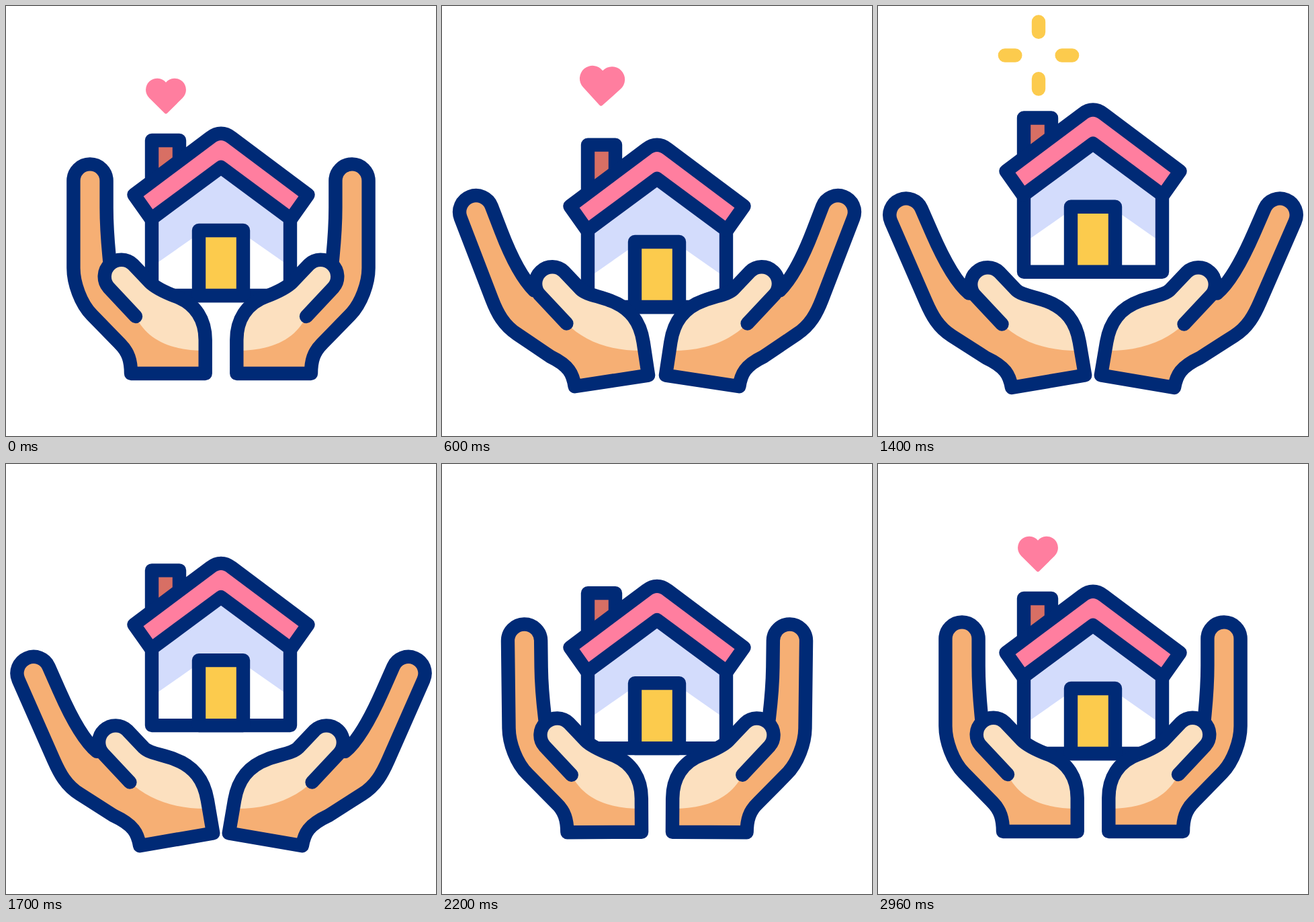
Animation of 640 by 640 pixels, one loop 3000 ms. Source, as an HTML page:

```html
<!DOCTYPE html>
<html lang="en">
<head>
<meta charset="utf-8">
<title>Home in caring hands</title>
<style>
  html, body { margin: 0; height: 100%; overflow: hidden; background: #fff; }
  svg { display: block; width: 100vw; height: 100vh; }
  .line { stroke: #002a76; stroke-width: 20.4; stroke-linecap: round; stroke-linejoin: round; }
</style>
</head>
<body>
<svg viewBox="0 0 640 640">
  <path id="heart" fill="#ff7e9f" d="M0-20.8A17 17 0 1 0-24.7 2.5L-2 25Q0 27 2 25L24.7 2.5A17 17 0 1 0 0-20.8Z"/>
  <path id="spark" fill="none" stroke="#fccb4d" stroke-linecap="round"/>
  <path id="chimney" class="line" fill="#d86f64" d="M217 275V200H258V255"/>
  <g id="house">
    <path fill="#fff" d="M217 431V312L320 240L423 312V431Z"/>
    <path fill="#d3dcfc" d="M217 388V312L320 240L423 312V388L363 346H277Z"/>
    <path class="line" fill="none" d="M217 318V431H423V318"/>
    <path class="line" fill="#fccb4d" d="M287 431V334H353V431Z"/>
    <path class="line" fill="#ff7e9f" d="M190.5 281L304 196Q320 183.5 336 196L449.5 281L424 317L320 240L216 317Z"/>
  </g>
  <g id="hand">
    <path id="skin" fill="#f6af74"/>
    <path id="palm" fill="#fce0bf"/>
    <path id="edge" class="line" fill="none"/>
  </g>
  <use href="#hand" transform="matrix(-1 0 0 1 640 0)"/>
</svg>
<script>
const LOOP = 3000;
const set = (id, name, value) => document.getElementById(id).setAttribute(name, value);

// Progress from 0 to 1 between times a and b, with three kinds of easing
const linear = (t, a, b) => Math.min(1, Math.max(0, (t - a) / (b - a)));
const smooth = (t, a, b) => { const x = linear(t, a, b); return x * x * (3 - 2 * x); };
const easeOut = (t, a, b) => 1 - (1 - linear(t, a, b)) ** 2;

// Openness of the hands: negative is cupped, 0 upright, 1 spread
const openness = t => .9 * smooth(t, 0, 640) + .13 * linear(t, 560, 1640)
  - 1.6 * smooth(t, 1640, 2600) + .57 * smooth(t, 2540, 2960);

// Vertical shift of the house: dip, toss, float, fall, settle
const houseShift = t => 17 * smooth(t, 480, 600) - 40 * smooth(t, 640, 940)
  - 19 * linear(t, 900, 1680) + 52 * smooth(t, 1680, 2540) - 10 * smooth(t, 2560, 2960);

// The chimney trails the house until it falls
const chimneyShift = t => houseShift(t - 70 * (1 - smooth(t, 1500, 1900)));

// Each joint of the hand turns about a pivot and shifts; amounts are for a full spread
const JOINTS = [
  { x: 125, y: 260, turn: -23.5, dx: -83, dy: 51 },     // finger
  { x: 128, y: 460, turn: -13, dx: -18, dy: 31 },       // elbow
  { x: 186, y: 547, turn: -9.6, dx: 13, dy: 21 },       // base
  { x: 252, y: 432, turn: 0, dx: -2, dy: 7 },           // heel
  { x: 171, y: 402, turn: 0, dx: -8.5, dy: 11.5 },      // thumb
  { x: 154.5, y: 382, turn: -45, dx: -19, dy: 45.5 }    // web
];

function mover(joint, open) {
  const angle = joint.turn * open * Math.PI / 180;
  const c = Math.cos(angle), s = Math.sin(angle);
  const left = joint.x + joint.dx * open;
  const top = joint.y + joint.dy * Math.max(0, open) ** .8;
  return (x, y) => {
    x -= joint.x; y -= joint.y;
    return ` ${left + x * c - y * s} ${top + x * s + y * c} `;
  };
}

function drawHand(open) {
  const [f, e, b, p, h, w] = JOINTS.map(joint => mover(joint, open));
  const finger = 'M' + w(154.5, 382) + 'C' + w(152, 355) + f(149.6, 335) + f(149.6, 300)
    + 'L' + f(149.6, 260) + 'A24.6 24.6 0 0 0' + f(100.4, 260) + 'L' + f(100.4, 390);
  const wrist = 'C' + f(100.4, 412) + e(111, 443) + e(128, 460) + 'L' + e(170, 503)
    + 'C' + b(182, 515) + b(186, 528) + b(186, 547) + 'L' + b(296.7, 547);
  const top = 'L' + b(296.7, 497) + 'C' + b(296.7, 468) + p(283, 443) + p(252, 432)
    + 'C' + p(234, 425) + h(222, 419) + h(214, 411) + 'L' + h(189.3, 385)
    + 'A25 25 0 0 0' + h(152.7, 419) + 'L' + h(193, 462);
  set('skin', 'd', finger + wrist + top);
  set('edge', 'd', finger + wrist + top);
  set('palm', 'd', 'M' + h(193, 462) + 'C210 497 245 513 297 513' + top + 'Z');
}

function drawSpark(t) {
  const far = 57 * easeOut(t, 1140, 1540), near = 57 * easeOut(t, 1270, 1620);
  const rays = [[0, -1], [1, 0], [0, 1], [-1, 0]].map(([x, y]) =>
    `M${239 + x * near} ${73.5 + y * near}L${239 + x * far} ${73.5 + y * far}`);
  set('spark', 'd', rays.join(''));
  set('spark', 'stroke-width', 20.4 * linear(t, 1140, 1220) * linear(t, 1620, 1500));
}

// The heart floats up and pops, then a new one leaves the chimney
function drawHeart(t) {
  const fresh = t > 2440;
  const rise = fresh ? 0 : smooth(t, 350, 1130);
  const y = fresh ? 234 - 99.5 * easeOut(t, 2440, 2840) : 134.5 - 61 * rise;
  const size = fresh ? 1 : (1 + .28 * smooth(t, 150, 1130)) * (1 - smooth(t, 1080, 1180));
  set('heart', 'transform', `translate(238 ${y}) rotate(${12 * rise}) scale(${size})`);
}

function draw(t) {
  set('house', 'transform', `translate(0 ${houseShift(t)})`);
  set('chimney', 'transform', `translate(0 ${chimneyShift(t)})`);
  drawHeart(t);
  drawSpark(t);
  drawHand(openness(t));
}

const start = performance.now();
function tick() {
  draw((performance.now() - start) % LOOP);
  requestAnimationFrame(tick);
}
tick();
</script>
</body>
</html>
```
